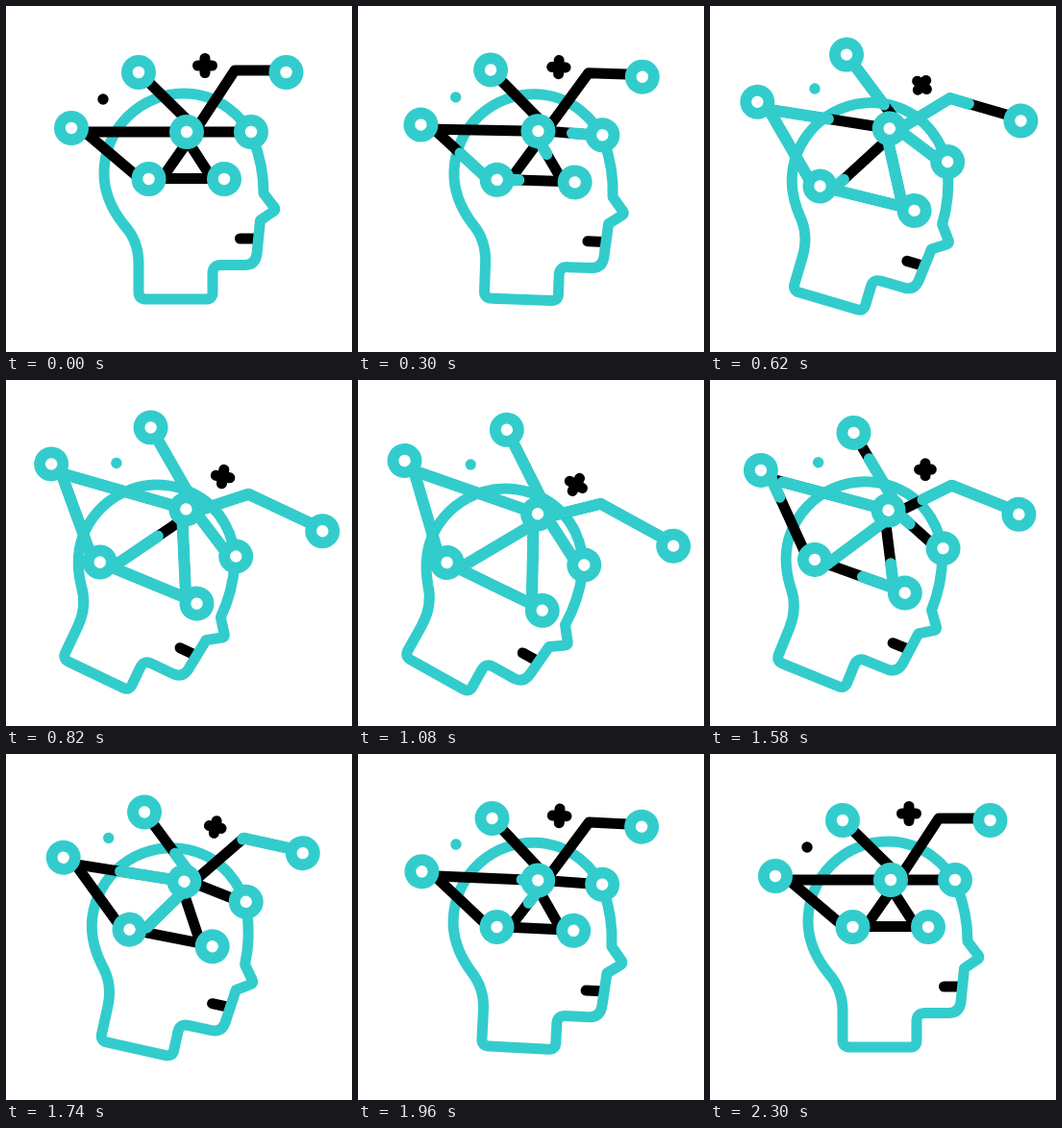
Write an HTML page with a canvas that moves like this. It is 360 px wide and 360 px high and loops after 2.4 s.

```html
<!DOCTYPE html>
<html>
<head>
<meta charset="utf-8">
<style>
  html, body { margin: 0; height: 100%; overflow: hidden; background: #fff; }
  canvas { display: block; width: 360px; height: 360px; }
</style>
</head>
<body>
<canvas id="stage" width="360" height="360"></canvas>
<script>
const ctx = document.getElementById('stage').getContext('2d');
const TEAL = '#33cccc', BLACK = '#000', LOOP = 2400, TRIM_DELAY = 1160;

const head = new Path2D(`M268 195 L278 208 Q282 212 277 214.5 L264.500 223 L261 258
  Q259.500 269 249 269.500 H224 Q215 269.500 215 278 V298 Q215 305 208 305 H146 Q138 305 138 298
  V268 C138 252 133 239 123 228 C110 212 102 194 102 174 A83 83 0 0 1 185 91
  C221 91 247 115 257 138 C265 158 268 177 268 195 Z`);

// Rest position and outward travel of each node
const nodes = {
  left: [68, 127, -29, 0],
  top: [138, 69, -21.7, -21.8],
  center: [188, 131, -1, -23],
  right: [291.5, 69, 35, -0.5],
  temple: [255, 131, 0, 0],
  lowLeft: [148.5, 180, -19.4, 18.2],
  lowRight: [227, 180, 13, 13.5],
  elbow: [238, 67, 1, 0]
};

// Trim start, trim duration, then points as [node, dx, dy]
const links = [
  [225, 500, ['top', 0, 0], ['center', 1, -12]],
  [380, 500, ['left', 16, 4], ['center', 0, 0]],
  [70, 500, ['lowLeft', -10, -1], ['left', 8, -1]],
  [70, 500, ['temple', -12, 0], ['center', 13, 0]],
  [300, 500, ['center', 8, 0], ['elbow', 0, 0], ['right', -10, -2]],
  [540, 500, ['lowLeft', 14, -1], ['center', 8, 0]],
  [70, 500, ['center', -5, 0], ['lowRight', -13, -1]],
  [250, 320, ['lowLeft', 14, -0.5], ['lowRight', -13, -0.5]]
];

const ramp = (t, start, span) => Math.min(1, Math.max(0, (t - start) / span));

function ease(t, start, span, power = 2.85) {
  const x = ramp(t, start, span);
  return x < 0.5 ? (2 * x) ** power / 2 : 1 - (2 - 2 * x) ** power / 2;
}

function stroke(points, color, width = 11) {
  ctx.strokeStyle = color;
  ctx.lineWidth = width;
  ctx.beginPath();
  points.forEach(p => ctx.lineTo(...p));
  ctx.stroke();
}

function disc(x, y, radius, color) {
  ctx.fillStyle = color;
  ctx.beginPath();
  ctx.arc(x, y, radius, 0, 2 * Math.PI);
  ctx.fill();
}

// Part of a polyline between two fractions of its length
function trim(points, from, to) {
  const lengths = points.slice(1).map((p, i) => Math.hypot(p[0] - points[i][0], p[1] - points[i][1]));
  const total = lengths.reduce((a, b) => a + b);
  const result = [];
  let walked = 0;
  lengths.forEach((length, i) => {
    const a = Math.max(0, (from * total - walked) / length);
    const b = Math.min(1, (to * total - walked) / length);
    const at = k => points[i].map((v, axis) => v + (points[i + 1][axis] - v) * k);
    if (a < b) result.push(at(a), at(b));
    walked += length;
  });
  return result;
}

function draw(t) {
  const tilt = ease(t, 5, 1180) - ease(t, 1132, 1155);
  const spread = ease(t, 43, 990) - ease(t, 1120, 1060);
  const spin = 90 * (ease(t, 400, 600, 2) + ease(t, 1290, 450, 2));
  const arm = 7.5 - 1.3 * Math.sin(Math.PI * spread);
  const place = ([name, dx, dy]) => {
    const [x, y, moveX, moveY] = nodes[name];
    return [x + moveX * spread + dx, y + moveY * spread + dy];
  };

  ctx.setTransform(1, 0, 0, 1, 0, 0);
  ctx.fillStyle = '#fff';
  ctx.fillRect(0, 0, 360, 360);
  ctx.translate(184 - 76.2 * tilt, 265 + 10.1 * tilt);
  ctx.rotate(29.2 * tilt * Math.PI / 180);
  ctx.translate(-184, -265);
  ctx.lineCap = ctx.lineJoin = 'round';

  stroke([[243.5, 242], [260, 242]], BLACK);
  ctx.strokeStyle = TEAL;
  ctx.stroke(head);
  disc(101, 97, 5.7, t > 150 && t < 2000 ? TEAL : BLACK);

  ctx.save();
  ctx.translate(207, 62);
  ctx.rotate(spin * Math.PI / 180);
  stroke([[-arm, 0], [arm, 0]], BLACK);
  stroke([[0, -arm], [0, arm]], BLACK);
  ctx.restore();

  const lines = links.map(([start, span, ...points]) => ({ start, span, points: points.map(place) }));
  lines.forEach(({ points }) => stroke(points, BLACK));
  lines.forEach(({ start, span, points }) => {
    const from = ramp(t, start + TRIM_DELAY, span), to = ramp(t, start, span);
    if (from < to) stroke(trim(points, from, to), TEAL, 12);
  });

  for (const name in nodes) {
    if (name === 'elbow') continue;
    const [x, y] = place([name, 0, 0]);
    disc(x, y, 18, TEAL);
    disc(x, y, 6.2, '#fff');
  }
}

function tick() {
  draw(performance.now() % LOOP);
  requestAnimationFrame(tick);
}
tick();
</script>
</body>
</html>
```
